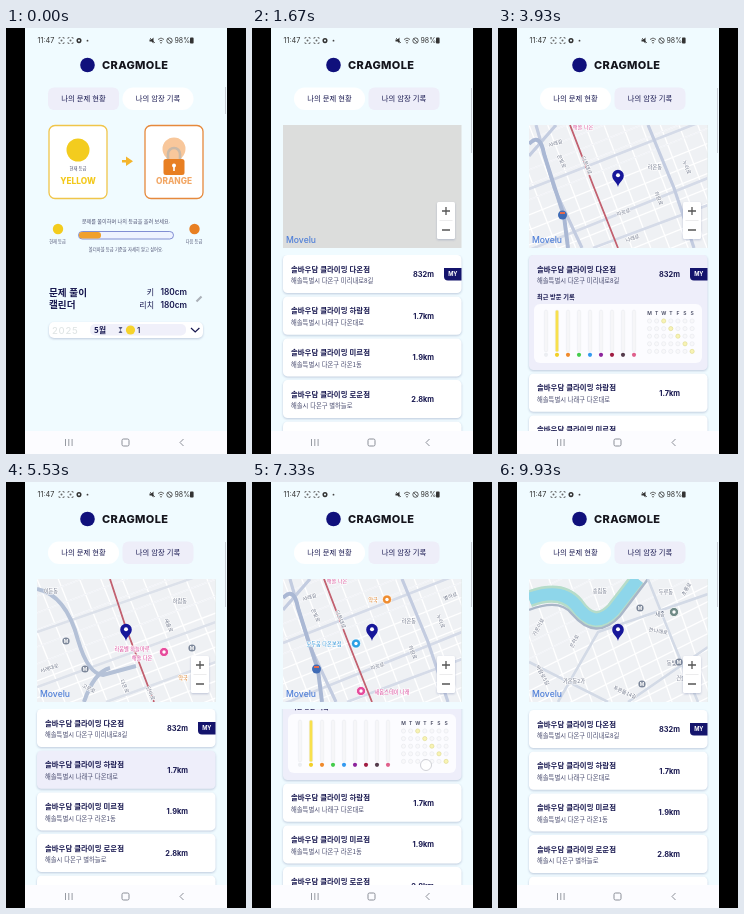
An HTML page for the animation above (9990 ms loop, 240 by 426 pixels).

```html
<!DOCTYPE html>
<html lang="ko">
<head>
<meta charset="utf-8">
<title>Climbing log</title>
<style>
  html, body { margin: 0; width: 100%; height: 100%; overflow: hidden; background: #000; }
  svg { display: block; width: 240px; height: 426px; font-family: "Noto Sans CJK KR", "Noto Sans CJK JP", "Noto Sans CJK", sans-serif; }
  .latin { font-family: Inter, sans-serif; }
  .shadow { filter: drop-shadow(0 1px 1px #7080a866); }
</style>
</head>
<body>
<svg id="stage" viewBox="0 0 240 426"></svg>
<script>
const LOOP = 9990, NAVY = '#17174f', LILAC = '#eeeef9', GREY = '#8b8f98';
const MAP = { x: 31, y: 97, w: 178.5, h: 123 };
const PITCH = 41.7, ROW_H = 38, EXPANDED = 77;

const rect = (x, y, w, h, fill, r = 0, extra = '') =>
  `<rect x="${x}" y="${y}" width="${w}" height="${h}" rx="${r}" fill="${fill}" ${extra}/>`;
const circle = (x, y, r, fill, extra = '') => `<circle cx="${x}" cy="${y}" r="${r}" fill="${fill}" ${extra}/>`;
const text = (x, y, size, str, fill = NAVY, weight = 700, extra = '') =>
  `<text x="${x}" y="${y}" font-size="${size}" fill="${fill}" font-weight="${weight}" ${extra}>${str}</text>`;
const stroke = (d, color, width = 1, extra = '') =>
  `<path d="${d}" fill="none" stroke="${color}" stroke-width="${width}" ${extra}/>`;
const shape = (d, fill) => `<path d="${d}" fill="${fill}"/>`;
const group = (id, body, extra = '') => `<g id="${id}" ${extra}>${body}</g>`;
const MID = 'text-anchor="middle"', END = 'text-anchor="end"', LATIN = 'class="latin"';

// ---------- phone frame ----------
function statusBar() {
  const focus = x => stroke(`M${x - 2.5} 11v-1.5h1.5M${x + 1} 9.5h1.5v1.5M${x - 2.5} 14v1.5h1.5M${x + 1} 15.5h1.5v-1.5`, '#555', .7)
    + circle(x, 12.5, 1, '#666');
  return text(31.5, 15.3, 7.3, '11:47', '#333', 400, LATIN) + focus(55.5) + focus(64.5)
    + circle(73, 12.6, 1.8, 'none', 'stroke="#333" stroke-width="1.5"') + circle(81.5, 12.7, .9, '#444')
    + shape('M143.500 11.500h2l2-2v6l-2-2h-2z', '#333') + stroke('M144 10l5 5', '#333', .7)
    + stroke('M152 11.500q3-3 6 0M153.500 13q1.500-1.500 3 0', '#555', .9) + circle(155, 14.7, .8, '#555')
    + circle(163.5, 12.6, 2.7, 'none', 'stroke="#333" stroke-width=".8"') + stroke('M161.700 10.800l3.600 3.600', '#333', .8)
    + text(168.5, 15.3, 7, '98%', '#333', 400, LATIN) + rect(184, 9.6, 3.6, 6, '#333', .8);
}

const navBar = () => rect(19, 403, 202, 23, '#fcfcff')
  + stroke('M59.500 411v7M62.800 411v7M66.100 411v7', GREY, .9)
  + rect(116, 411, 7, 7, 'none', 1.5, `stroke="${GREY}" stroke-width="1"`)
  + stroke('M177.500 411l-3.500 3.500l3.500 3.500', GREY);

const header = () => circle(81.5, 37, 7.3, '#10107c')
  + text(96, 41, 11, 'CRAGMOLE', '#15151d', 800, `${LATIN} letter-spacing=".35"`);

function tabs(active) {
  const tab = (i, label) => rect(42 + 74.5 * i, 59.5, 71, 22.5, i === active ? '#fff' : LILAC, i === active ? 11 : 6)
    + text(77.5 + 74.5 * i, 73.4, 7.3, label, NAVY, 500, MID);
  return tab(0, '나의 문제 현황') + tab(1, '나의 암장 기록');
}

// ---------- grade page ----------
function gradePage() {
  const card = (x, color) => rect(x, 97.5, 58, 73, '#fff', 6, `stroke="${color}" stroke-width="1.3"`);
  const grade = (x, str, fill) => text(x, 155.7, 8.3, str, fill, 800, `${LATIN} ${MID}`);
  const small = (x, y, size, str) => text(x, y, size, str, '#4b4f70', 500, MID);
  return tabs(1) + rect(219, 59, 1, 27, '#c9ced6')
    + card(43, '#f0c54a') + circle(72, 122, 11.5, '#f3cc1e') + small(72, 141.5, 4.3, '현재 등급') + grade(72, 'YELLOW', '#f3c91c')
    + card(139, '#e6893c') + circle(168, 121, 11.5, '#f8c79b')
    + stroke('M162 132v-6a6 6 0 0 1 12 0v6', '#c9b9a8', 2.6) + rect(157.5, 131, 21, 16, '#e87f22', 2.5)
    + circle(168, 137.5, 2, '#fff') + rect(167.2, 138, 1.6, 5, '#fff') + grade(168, 'ORANGE', '#f2a765')
    + shape('M116 132h4v-3.500l7 4.800l-7 4.800v-3.500h-4z', '#f4b52c')
    + small(120, 194.5, 5.1, '문제를 풀이하며 나의 등급을 올려 보세요.')
    + rect(72.5, 203.5, 95, 7.5, '#eef3ff', 3.7, 'stroke="#6674c8" stroke-width=".8"') + rect(73, 204, 22, 6.5, '#f0a02c', 3)
    + circle(52, 201, 5.2, '#f3cc1e') + small(51.5, 214.5, 4.2, '현재 등급')
    + circle(188.5, 201, 5.2, '#e87f22') + small(188, 214.5, 4.2, '다음 등급')
    + small(120, 223.3, 4.3, '볼더마블 등급 기준을 자세히 알고 싶어요.')
    + text(43, 267.5, 9.6, '문제 풀이') + text(43, 280.3, 9.6, '캘린더')
    + text(148, 267, 8, '키', NAVY, 500, END) + text(148, 280, 8, '리치', NAVY, 500, END)
    + text(181, 267, 8.3, '180cm', NAVY, 600, `${LATIN} ${END}`) + text(181, 280, 8.3, '180cm', NAVY, 600, `${LATIN} ${END}`)
    + stroke('M190.500 273.500l5-5', '#aab0b8', 2.2)
    + rect(43, 294, 154, 16, '#fff', 5, 'class="shadow"') + text(46, 305.5, 9.5, '2025', '#e1e6e6', 500, `${LATIN} letter-spacing=".7"`)
    + rect(84, 296, 96, 11.5, '#f0f0fa', 5) + text(88, 305, 8, '5월')
    + shape('M112.500 299h4l-4 6h4z', '#555a80') + circle(124.5, 302, 4.6, '#f6d32c')
    + text(131, 305.2, 8, '1', NAVY, 500, LATIN) + stroke('M185 300l4.200 4l4.200-4', NAVY, 1.2);
}

// ---------- map: four tiles stacked north to south, each in screen coordinates ----------
const label = (x, y, str, turn = 0, fill = '#6c7488') =>
  text(x, y, 5.2, str, fill, 500, `${MID} transform="rotate(${turn} ${x} ${y})" stroke="#fff" stroke-width="1.2" paint-order="stroke"`);
const poi = (x, y, fill) => circle(x, y, 4.6, fill, 'stroke="#fff" stroke-width=".8"') + circle(x, y, 1.7, '#fff');
const station = (x, y) => circle(x, y, 3.6, '#7b8699') + text(x, y + 1.8, 4.8, 'M', '#fff', 700, `${LATIN} ${MID}`);
const pin = () => shape('M120 159c-1-5-5.800-6.500-5.800-11.500a5.800 5.800 0 0 1 11.600 0c0 5-4.800 6.500-5.800 11.500z', '#17179a')
  + circle(120, 147.3, 2, '#fff');

function streets(slope, lean, gap) {
  let across = '', down = '';
  for (let i = -4; i < 16; i++) {
    across += `M31 ${97 + i * gap}l179 ${179 * slope}`;
    down += `M${31 + i * gap * 1.25} 97l${123 * lean} 123`;
  }
  return stroke(across + down, '#fff', 1.3) + stroke(across.slice(0, across.length / 2), '#dfe3ec', .5);
}

const southTile = () => streets(-.4, .38, 15)
  + stroke('M31 161L210 91M31 222L210 150M95 220L210 177', '#d5dbe8', 2.6)
  + stroke('M38 97L56 160L84 220M31 128L58 97M150 97L176 160L196 220', '#c3cce0', 3.2)
  + stroke('M31 116Q42 104 46 126Q58 164 66 188L70 220', '#aab8d4', 4)
  + stroke('M72 97L95 157L120 220', '#c2606f', 1.8)
  + label(58, 117, '서래길', -18) + label(62, 134, '은빛로', 65) + label(87, 138, '다온대로', 67)
  + label(157, 141, '라온동') + label(126, 186, '미르로', -18) + label(135, 212, '나래로', -18)
  + label(159, 171, '하람로', 68) + label(187, 140, '누리로', 68) + label(85, 101, '해솔 다온', 0, '#d8589c')
  + circle(64.5, 187, 4.5, '#3f6bb5') + rect(62, 184, 5, 2, '#e36a4e')
  + group('places', label(121, 120, '약국', 0, '#dc8430') + poi(135, 117.5, '#ee8c30')
    + label(72, 164, '모두움 다온본점', 0, '#2b91d6') + poi(104, 161.5, '#2ba0e4')
    + poi(109, 209, '#e64b9c') + label(140, 211.5, '새봄스테이 나래', 0, '#d8489a')
    + label(199, 116, '별하로', -20)) + pin();

const midTile = () => streets(-.38, .4, 17)
  + stroke('M31 150L210 88M31 205L210 140M100 220L210 180', '#dce1ea', 2.4)
  + stroke('M31 107Q60 113 72 158Q82 192 97 193L130 184M78 220Q88 190 104 186', '#b4c1d7', 4)
  + stroke('M104 97L120 146L148 220', '#c2606f', 1.8)
  + label(45, 111, '이든동') + label(174, 121, '하람동') + label(44, 188, '서래대로', -18) + label(82, 208, '고운로', 28)
  + label(117, 205, '다온로', 66) + label(143, 212, '단비로', 68) + label(161, 144, '새솔로', 67)
  + station(60, 159) + station(79, 187) + station(186, 166)
  + label(126, 169, '라움벨 하늘마루', 0, '#d8489a') + label(136, 178, '해솔 다온', 0, '#d8489a') + poi(158, 170, '#e64b9c')
  + label(177, 198, '약국', 0, '#dc8430') + poi(193, 194, '#ee8c30') + pin();

const riverTile = () => streets(.28, -.3, 19)
  + shape('M31 125L78 137L136 155L174 174L188 190L178 202L146 202L120 219L84 207L31 192z', '#8ed6ea')
  + stroke('M31 123L80 135L137 154L174 173L210 184', '#a9b6c4', 4) + stroke('M31 194L82 209L120 220', '#a9b6c4', 3.5)
  + stroke('M112 97L139 155L92 220M199 120L170 220', '#aab4c5', 3)
  + circle(140, 155, 6, 'none', 'stroke="#aab4c5" stroke-width="2"')
  + shape('M150 175L186 186L180 190L152 181z', '#bfe3c2')
  + label(67, 106, '솔빛로', 18) + label(122, 109, '가온동2가') + label(166, 184, '노을빛공원', 0, '#4c8c63')
  + poi(33, 190, '#c460c8') + label(48, 219, '별빛미술관', 0, '#a04ec0');

const northTile = () => streets(-.5, .35, 16)
  + stroke('M31 117Q63 105 78 123Q96 149 116 128L140 97', '#b6dcc9', 17)
  + stroke('M31 117Q63 105 78 123Q96 149 116 128L140 97', '#8ed6ea', 12)
  + stroke('M31 128Q62 116 74 132Q98 160 122 134L150 97', '#a9b6c8', 2.4)
  + stroke('M60 220L100 150L210 112M31 180L110 220M130 220L210 165M150 97L175 160L200 220', '#d3dae6', 2.6)
  + label(102, 111, '송림동') + label(42, 146, '가온이로', -62) + label(78, 160, '은하로', -62) + label(43, 194, '바람로5길', 62)
  + label(168, 112, '두루동') + label(190, 108, '초롱로', -60) + label(160, 151, '한나래로', 10) + label(176, 183, '동빛로')
  + label(76, 201, '가온동2가') + label(126, 212, '푸른들14길', 24) + label(162, 134, '새종', 0, '#5f6a80')
  + station(142, 126) + poi(176, 130, '#6f8a86') + station(181, 180) + station(144, 202) + label(183, 198, '건솔') + pin();

function mapView() {
  const tiles = [northTile, riverTile, midTile, southTile].map((tile, i) =>
    `<g transform="translate(0 ${i * MAP.h})"><g clip-path="url(#mapClip)">${rect(MAP.x, MAP.y, MAP.w, MAP.h, '#eff1f4')}${tile()}</g></g>`).join('');
  return rect(MAP.x, MAP.y, MAP.w, MAP.h, '#dcdddc')
    + `<g clip-path="url(#mapClip)">${group('world', tiles)}</g>`
    + text(34, 215, 8.6, 'Movelu', '#4f7fd8', 500, LATIN)
    + rect(185, 174, 18, 37, '#fff', 1.5, 'class="shadow"')
    + stroke('M187.500 192.500h13', '#e4e4e6', .7) + stroke('M190 183h8M194 179v8M190 202h8', '#555', 1.3);
}

// ---------- gym list ----------
const gyms = [
  ['다온점', '해솔특별시 다온구 미리내로8길', '832m'],
  ['하람점', '해솔특별시 나래구 다온대로', '1.7km'],
  ['미르점', '해솔특별시 다온구 라온1동', '1.9km'],
  ['로운점', '해솔시 다온구 별하늘로', '2.8km'],
  ['가온점', '해솔 가람구 은하수로17길', '5.4km'],
  ['누리점', '해솔특별시 푸른구 푸른대로', '5.6km'],
  ['보람점', '해솔특별시 보람구 보람로', '6.1km'],
];

function visits() {
  const colors = ['#eceef2', '#f2cf28', '#f08a2c', '#45cc4c', '#349af0', '#8d249c', '#a01c42', '#553c4c', '#e0608c'];
  let out = text(39, 44, 6.2, '최근 방문 기록') + rect(36, 49, 168, 59, '#fcfcff', 6);
  colors.forEach((color, i) => {
    const x = 48 + 11 * i;
    out += rect(x - 1.7, 55, 3.4, 42, i === 1 ? '#f8e04c' : '#f6f6f8', 1.7, 'stroke="#e9eaee" stroke-width=".5"')
      + circle(x, 99.8, 2.1, color);
  });
  [...'MTWTFSS'].forEach((day, col) => {
    const x = 151.5 + 7.1 * col;
    out += text(x, 60, 5, day, '#44475f', 600, `${LATIN} ${MID}`);
    for (let row = 0; row < 5; row++) {
      const active = (row * 3 + col * 5) % 8 === 2;
      out += circle(x, 66 + 7.6 * row, 2.1, active ? '#f8f3b4' : '#f8f8fa', `stroke="${active ? '#dcd98a' : '#e6e7ec'}" stroke-width=".6"`);
    }
  });
  return out;
}

const gymRow = ([branch, address, distance], i) => group('row' + i,
  rect(31, 0, 178.5, ROW_H, '#fff', 4.5, `id="card${i}" class="shadow"`)
  + text(39, 16.6, 7.4, '솔바우담 클라이밍 ' + branch) + text(39, 28.3, 6.3, address, '#45486c', 400)
  + text(182, 22, 7.4, distance, NAVY, 700, `${LATIN} ${END}`)
  + (i ? '' : shape('M209.500 13v12.500h-13.500a4 4 0 0 1-4-4v-8.500z', '#14146c')
    + text(200.8, 21.4, 5.6, 'MY', '#fff', 700, `${LATIN} ${MID}`)
    + group('visits', visits(), 'clip-path="url(#cardClip)"')));

const gymPage = () => tabs(0) + rect(219, 60, 1, 65, '#c9ced6') + mapView()
  + `<g clip-path="url(#listClip)">${gyms.map(gymRow).join('')}</g>`
  + circle(174, 283, 5.5, '#ffffffcc', 'id="touch" stroke="#c4c6cc" stroke-width=".8"');

const clip = (id, x, y, w, h) => `<clipPath id="${id}">${rect(x, y, w, h, '#000', 0, `id="${id}Box"`)}</clipPath>`;

document.getElementById('stage').innerHTML = `<defs>${clip('mapClip', MAP.x, MAP.y, MAP.w, MAP.h)}
  ${clip('listClip', 19, 227, 202, 176)}${clip('cardClip', 31, 0, 178.5, ROW_H)}</defs>`
  + rect(0, 0, 240, 426, '#000') + rect(19, 0, 202, 426, '#f0fbff') + statusBar() + header()
  + group('grades', gradePage()) + group('gyms', gymPage()) + navBar();

// ---------- motion ----------
const el = id => document.getElementById(id);
const show = (id, on) => el(id).setAttribute('display', on ? 'inline' : 'none');
const within = (t, from, to) => t >= from && t < to;

// Eased value through [time, value] keys.
function track(t, keys) {
  let i = keys.findIndex(key => key[0] > t);
  if (i < 0) return keys[keys.length - 1][1];
  if (!i) return keys[0][1];
  const [t0, a] = keys[i - 1], [t1, b] = keys[i], p = (t - t0) / (t1 - t0);
  return a + (b - a) * p * p * (3 - 2 * p);
}

const tileKeys = [[4900, 3], [5400, 2], [6200, 2], [6700, 3], [8350, 3], [8700, 1], [8780, 1], [9250, 0]];
const openKeys = [[3000, 0], [3250, 1], [4950, 1], [5200, 0], [6300, 0], [6550, 1], [7750, 1], [8000, 0]];
const scrollKeys = [[6850, 0], [7200, 44], [7700, 44], [8200, 74], [9200, 74], [9700, -1]];

function render(t) {
  show('grades', t < 1000);
  show('gyms', t >= 1000);
  show('world', t >= 2000);
  show('places', t >= 6700);
  show('touch', within(t, 6850, 7450));
  el('world').setAttribute('transform', `translate(0 ${-MAP.h * track(t, tileKeys)})`);

  const open = track(t, openKeys), extra = EXPANDED * open, scroll = track(t, scrollKeys);
  gyms.forEach((_, i) => {
    const y = 227 + PITCH * i + (i ? extra : 0) - scroll;
    const pressed = i === 0 && open > 0 || i === 1 && within(t, 4900, 5900) || i === 4 && within(t, 8300, 9100);
    el('row' + i).setAttribute('transform', `translate(0 ${y})`);
    el('card' + i).setAttribute('fill', pressed ? '#eeeefa' : '#fff');
  });
  el('card0').setAttribute('height', ROW_H + extra);
  el('cardClipBox').setAttribute('height', ROW_H + extra);
  show('visits', open > 0);
}

function tick() {
  render(performance.now() % LOOP);
  requestAnimationFrame(tick);
}
tick();
</script>
</body>
</html>
```
